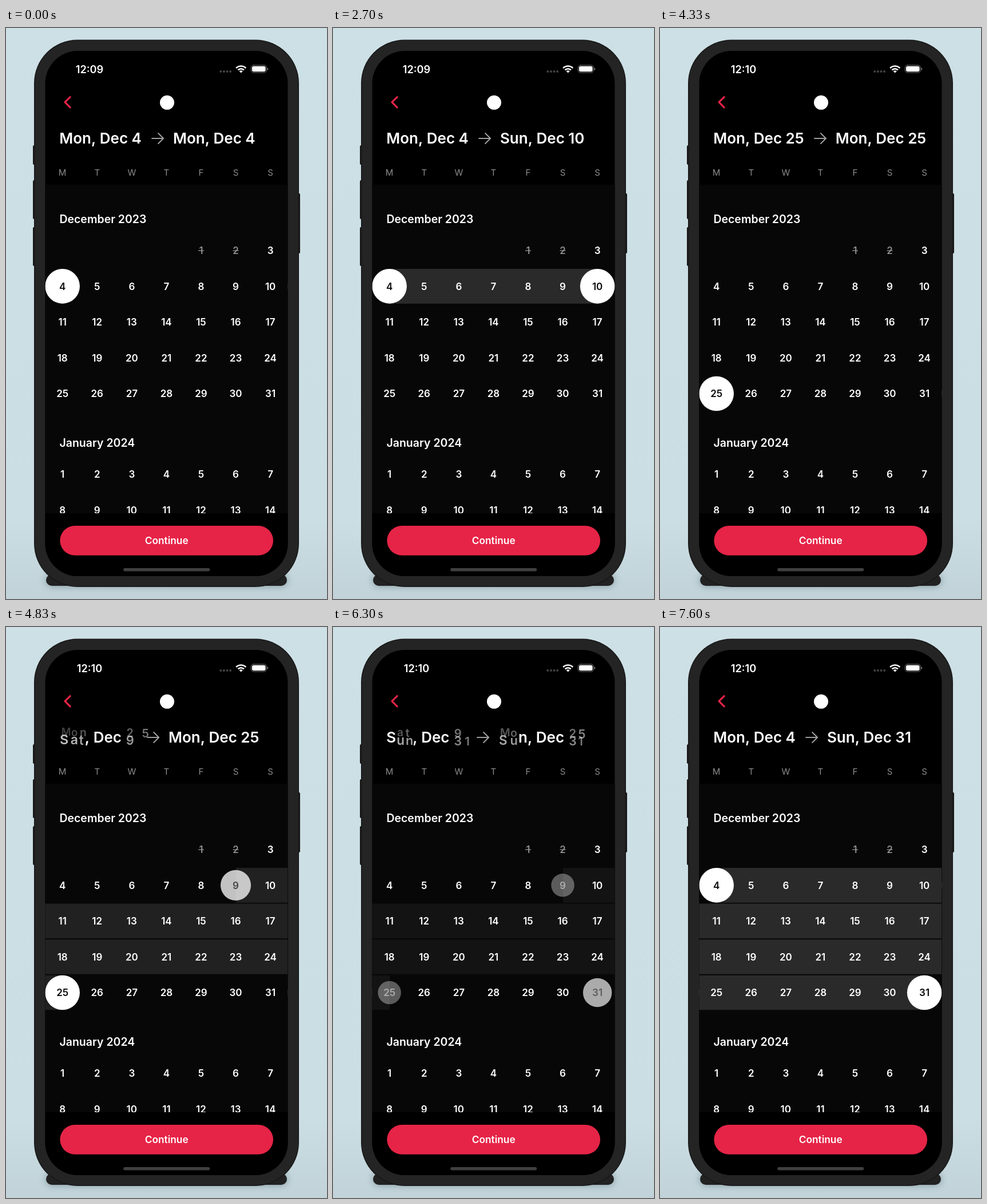
Write an HTML page with a canvas that moves like this. It is 561x998 px and loops after 8 s.

```html
<!DOCTYPE html>
<html lang="en">
<head>
<meta charset="utf-8">
<title>Date range picker</title>
<style>
  html, body { margin: 0; width: 100%; height: 100%; overflow: hidden; background: #cde0e6; }
  canvas { display: block; width: 561px; height: 998px; }
</style>
</head>
<body>
<canvas id="stage" width="561" height="998"></canvas>
<script>
const ctx = document.getElementById('stage').getContext('2d');
const LOOP = 8000, RED = '#e62447';
const LEFT = 68.4, COL = 60.57, ROW = 62.55, RADIUS = 30.3;

// Selected December days, with the time each selection begins
const picks = [
  { at: -1000, from: 4, to: 4 },
  { at: 1685, from: 4, to: 10 },
  { at: 3085, from: 25, to: 25 },
  { at: 4615, from: 9, to: 25 },
  { at: 6120, from: 31, to: 31 },
  { at: 6985, from: 4, to: 31 }
];

const mix = (a, b, p) => a + (b - a) * p;
const column = i => LEFT + COL * (i + 0.5);
const cellOf = day => ({ col: (day + 3) % 7, row: Math.floor((day + 3) / 7) });
const dateText = day => ['Sun', 'Mon', 'Tue', 'Wed', 'Thu', 'Fri', 'Sat'][(day + 4) % 7] + ', Dec ' + day;

// Critically damped spring, 0.5 s response
function spring(ms) {
  if (ms <= 0) return 0;
  if (ms > 600) return 1;
  const x = ms / 1000 * Math.PI * 4;
  return 1 - (1 + x) * Math.exp(-x);
}

function box(x, y, w, h, r, fill) {
  ctx.beginPath();
  ctx.roundRect(x, y, w, h, r);
  ctx.fillStyle = fill;
  ctx.fill();
}

function disc(x, y, r, fill) {
  ctx.beginPath();
  ctx.arc(x, y, r, 0, Math.PI * 2);
  ctx.fillStyle = fill;
  ctx.fill();
}

function line(color, width, ...points) {
  ctx.beginPath();
  points.forEach(([x, y]) => ctx.lineTo(x, y));
  ctx.strokeStyle = color;
  ctx.lineWidth = width;
  ctx.lineCap = ctx.lineJoin = 'round';
  ctx.stroke();
}

function font(size, weight = 600) {
  ctx.font = `${weight} ${size}px Inter, sans-serif`;
}

// Text whose capitals are vertically centred on y
function label(text, x, y, size, color = '#fff', align = 'center', weight = 600) {
  font(size, weight);
  ctx.textAlign = align;
  ctx.fillStyle = color;
  ctx.fillText(text, x, y + size * 0.364);
}

function drawPhone() {
  const backdrop = ctx.createLinearGradient(0, 0, 0, 998);
  backdrop.addColorStop(0, '#cde0e6');
  backdrop.addColorStop(0.86, '#cbdee4');
  backdrop.addColorStop(1, '#c1d3d9');
  box(0, 0, 561, 998, 0, backdrop);

  ctx.save();
  ctx.shadowColor = 'rgba(40,60,70,.45)';
  ctx.shadowBlur = 14;
  box(70, 955, 421, 20, 10, '#222');
  ctx.restore();

  [[47, 205, 34], [47, 266, 68], [47, 348, 68], [508, 289, 105]]
    .forEach(([x, y, h]) => box(x, y, 6, h, 2, '#1b1b1b'));
  box(49, 20.5, 463, 956.5, 76, '#191919');
  box(50.5, 22, 460, 953.5, 75, '#242424');
}

function drawStatus(t) {
  label(t < 4330 ? '12:09' : '12:10', 146, 72, 18.2);
  for (let i = 0; i < 4; i++) disc(375.3 + i * 5.6, 76, 2, '#454545');

  ctx.save();
  ctx.beginPath();
  ctx.moveTo(410.7, 78.5);
  ctx.arc(410.7, 78.5, 13.6, -Math.PI * 0.75, -Math.PI * 0.25);
  ctx.clip();
  disc(410.7, 78.5, 4.2, '#fff');
  for (const r of [7.3, 12]) {
    ctx.beginPath();
    ctx.arc(410.7, 78.5, r, 0, Math.PI * 2);
    ctx.strokeStyle = '#fff';
    ctx.lineWidth = 2.6;
    ctx.stroke();
  }
  ctx.restore();

  ctx.beginPath();
  ctx.roundRect(428.3, 65, 27, 13, 4.2);
  ctx.strokeStyle = '#777';
  ctx.lineWidth = 1;
  ctx.stroke();
  box(430, 66.7, 23.6, 9.6, 2.7, '#fff');
  box(456.5, 69.5, 1.6, 4.2, 1, '#777');
}

// Changed characters roll upwards one after another
function rollText(before, after, xBefore, xAfter, elapsed) {
  const p = spring(elapsed), size = 26, y = 193 + size * 0.364;
  const offset = (text, i) => ctx.measureText(text.slice(0, i + 1)).width - ctx.measureText(text[i]).width;
  font(size);
  ctx.textAlign = 'left';
  ctx.fillStyle = '#fff';
  if (before === after || p === 1) {
    ctx.fillText(after, mix(xBefore, xAfter, p), y);
    return;
  }
  const glyph = (char, x, alpha, dy) => {
    const half = ctx.measureText(char).width / 2, scale = mix(0.6, 1, alpha);
    ctx.save();
    ctx.globalAlpha = alpha;
    ctx.translate(x + half, 193 + dy);
    ctx.scale(scale, scale);
    ctx.fillText(char, -half, size * 0.364);
    ctx.restore();
  };
  let changed = 0;
  for (let i = 0; i < Math.max(before.length, after.length); i++) {
    const a = before[i], b = after[i];
    const xa = a && xBefore + offset(before, i), xb = b && xAfter + offset(after, i);
    const x = a && b ? mix(xa, xb, p) : a ? xa : xb;
    if (a === b) {
      ctx.fillText(a, x, y);
      continue;
    }
    const q = spring(elapsed - 18 * changed++);
    if (a) glyph(a, x, 1 - q, -13 * q);
    if (b) glyph(b, x, q, 13 * (1 - q));
  }
}

function drawHeader(old, now, elapsed) {
  line(RED, 3.2, [112.2, 120.6], [103, 129.7], [112.2, 138.8]);
  disc(281.5, 130.3, 12.5, '#fff');

  const x = 93.2;
  font(26);
  const end = pick => x + ctx.measureText(dateText(pick.from)).width;
  const endOld = end(old), endNow = end(now);
  rollText(dateText(old.from), dateText(now.from), x, x, elapsed);
  const tip = mix(endOld, endNow, spring(elapsed)) + 38.2;
  line('#a0a0a0', 1.9, [tip - 20, 193], [tip, 193]);
  line('#a0a0a0', 1.9, [tip - 9, 184], [tip, 193], [tip - 9, 202]);
  rollText(dateText(old.to), dateText(now.to), endOld + 55, endNow + 55, elapsed);

  [...'MTWTFSS'].forEach((day, i) => label(day, column(i), 252.5, 15.1, '#8c8c8c', 'center', 400));
}

function drawDays(old, now, p) {
  const blend = test => mix(+test(old), +test(now), p);
  const band = (x0, x1, y, alpha) => {
    if (!alpha) return;
    const a = Math.round(x0), b = Math.round(x1);
    ctx.globalAlpha = alpha;
    box(a, y - RADIUS, b - a, RADIUS * 2, 0, '#2a2a2a');
    ctx.globalAlpha = 1;
  };
  label('December 2023', 93.4, 333.8, 19.5, '#fff', 'left');
  label('January 2024', 93.4, 724.8, 19.5, '#fff', 'left');

  for (let day = 1; day <= 31; day++) {
    const { col, row } = cellOf(day), x = column(col), y = 388.8 + row * ROW;
    band(x - COL / 2, x, y, blend(s => day > s.from && day <= s.to));
    band(x, x + COL / 2, y, blend(s => day >= s.from && day < s.to));
  }
  for (let day = 1; day <= 31; day++) {
    const { col, row } = cellOf(day), x = column(col), y = 388.8 + row * ROW;
    const on = blend(s => day === s.from || day === s.to);
    if (on) {
      ctx.globalAlpha = on;
      disc(x, y, RADIUS * mix(0.5, 1, on), '#fff');
      if (col % 6 === 0) box(col ? 68 : 492, y - 5, 1, 10, 0, '#444');
      ctx.globalAlpha = 1;
    }
    const shade = Math.round(mix(255, 10, on));
    const past = day < 3;
    label(day, x, y, 17, past ? '#9a9a9a' : `rgb(${shade},${shade},${shade})`, 'center', past ? 500 : 600);
    if (past) line('#9a9a9a', 1.3, [x - 4.5, y + 0.4], [x + 4.5, y + 0.4]);
  }
  for (let i = 0; i < 14; i++) label(i + 1, column(i % 7), 780 + Math.floor(i / 7) * ROW, 17);
}

function draw(t) {
  const index = picks.findLastIndex(pick => pick.at <= t);
  const now = picks[index], old = picks[Math.max(0, index - 1)];
  const elapsed = t - now.at;

  drawPhone();
  ctx.save();
  ctx.beginPath();
  ctx.roundRect(68.5, 40, 424, 918, 57);
  ctx.clip();
  box(68, 40, 425, 918, 0, '#000');
  box(68, 274, 425, 574, 0, '#070707');
  drawDays(old, now, spring(elapsed));
  box(68, 848, 425, 110, 0, '#000');
  drawStatus(t);
  drawHeader(old, now, elapsed);
  box(94.4, 870, 372.6, 51.8, 26, RED);
  label('Continue', 280.7, 896, 17.3);
  box(205.2, 944, 151, 5.4, 2.7, '#404040');
  ctx.restore();
}

function tick() {
  draw(performance.now() % LOOP);
  requestAnimationFrame(tick);
}
tick();
</script>
</body>
</html>
```
